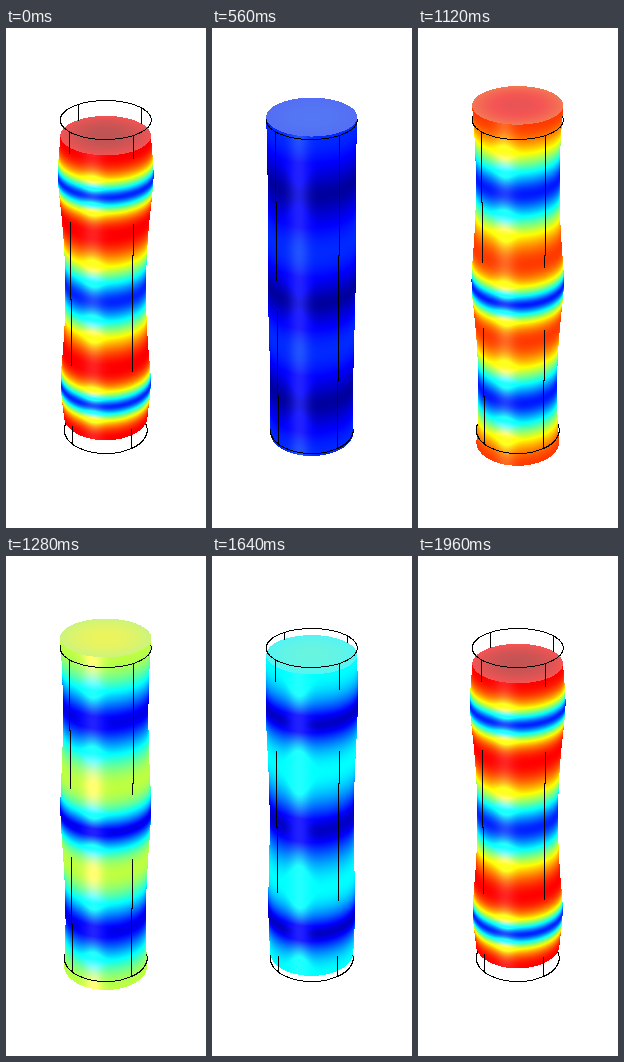
A matplotlib script for the animation above (2 s loop, 200 px wide and 500 px high).

```python
import numpy as np
import matplotlib.pyplot as plt
from matplotlib.animation import FuncAnimation

W, H, FRAMES = 200, 500, 50
R, HALF = 43.4, 178.6            # cylinder radius and half length
DIST, ELEV = 1954, np.radians(30)
CX, CY = 99.2, 253.2
AXIAL, RADIAL = 16.5, 3.0        # vibration amplitudes
K = 3 * np.pi / (2 * HALF)
SIN, COS = np.sin(ELEV), np.cos(ELEV)


def rainbow(v):
    """Blue-cyan-yellow-red ramp with dark ends."""
    return np.clip(1.5 - np.abs(4 * v[..., None] - [3, 2, 1]), 0, 1)


def project(x, y, z):
    """Screen position and ray parameter of a point (y towards viewer, z up)."""
    t = 1 - (y * COS + z * SIN) / DIST
    return CX + x / t, CY - (z * COS - y * SIN) / t, t


def axial(s, amp):
    return AXIAL * amp * np.sin(K * s)


def radial(s, amp):
    return -RADIAL * amp * np.cos(K * s)


def hit(px, py, amp):
    """Cast rays at the vibrating rod; return side and cap hits."""
    dx, up = px - CX, CY - py
    dy = -DIST * COS - up * SIN
    dz = -DIST * SIN + up * COS
    oy, oz = DIST * COS, DIST * SIN

    a, b = dx**2 + dy**2, oy * dy
    r, s = np.full(px.shape, R), np.zeros(px.shape)
    for _ in range(14):
        disc = b * b - a * (oy * oy - r * r)
        t = (-b - np.sqrt(np.maximum(disc, 0))) / a
        z = oz + t * dz
        s = z - axial(s, amp)
        r = R + radial(np.clip(s, -HALF, HALF), amp)
    side = (disc >= 0) & (np.abs(s) <= HALF)

    tc = (HALF + axial(HALF, amp) - oz) / dz
    rho = np.hypot(tc * dx, oy + tc * dy) / R
    cap = (rho <= 1) & ~side
    depth = np.where(side, t, np.where(cap, tc, np.inf))
    return side, cap, s, t * dx / R, rho, depth


def wireframe():
    """Edges of the rod at rest: two rims and four straight lines."""
    ang = np.linspace(0, 2 * np.pi, 290)
    for z in (HALF, -HALF):
        yield project(R * np.cos(ang), R * np.sin(ang), np.full(ang.shape, z))
    zs = np.linspace(-HALF, HALF, 700)
    for q in range(4):
        phi = np.radians(52.3 + 90 * q)
        yield project(R * np.cos(phi), R * np.sin(phi), zs)


GX, GY = np.meshgrid(np.arange(W, dtype=float), np.arange(H, dtype=float))
EX, EY, ET = (np.concatenate(c) for c in zip(*wireframe()))


def render(amp):
    side, cap, s, nx, rho, _ = hit(GX, GY, amp)
    img = np.ones((H, W, 3))

    size = 0.88 * np.hypot(axial(s, amp), radial(s, amp)) / AXIAL
    gloss = 0.22 * np.exp(-((nx + 0.28) / 0.22) ** 2)[..., None]
    skin = rainbow(size) * (1 + gloss) + 0.6 * gloss
    img[side] = skin[side]

    top = rainbow(abs(amp) * (0.96 - 0.08 * rho**2)) * 0.63 + 0.33
    img[cap] = top[cap]

    # One-pixel edges wherever the rod does not hide them
    seen = ET <= hit(EX, EY, amp)[-1] + 0.95 / DIST
    img[np.rint(EY[seen]).astype(int), np.rint(EX[seen]).astype(int)] = 0
    return np.clip(img, 0, 1)


fig = plt.figure(figsize=(W / 100, H / 100), dpi=100, facecolor="white")
ax = fig.add_axes([0, 0, 1, 1])
ax.axis("off")
pic = ax.imshow(np.ones((H, W, 3)), interpolation="nearest", aspect="auto")


def update(i):
    pic.set_data(render(np.cos(2 * np.pi * i / FRAMES)))
    return [pic]


anim = FuncAnimation(fig, update, frames=FRAMES, interval=40,
                     repeat=True, repeat_delay=0, blit=False)
plt.show()
```
